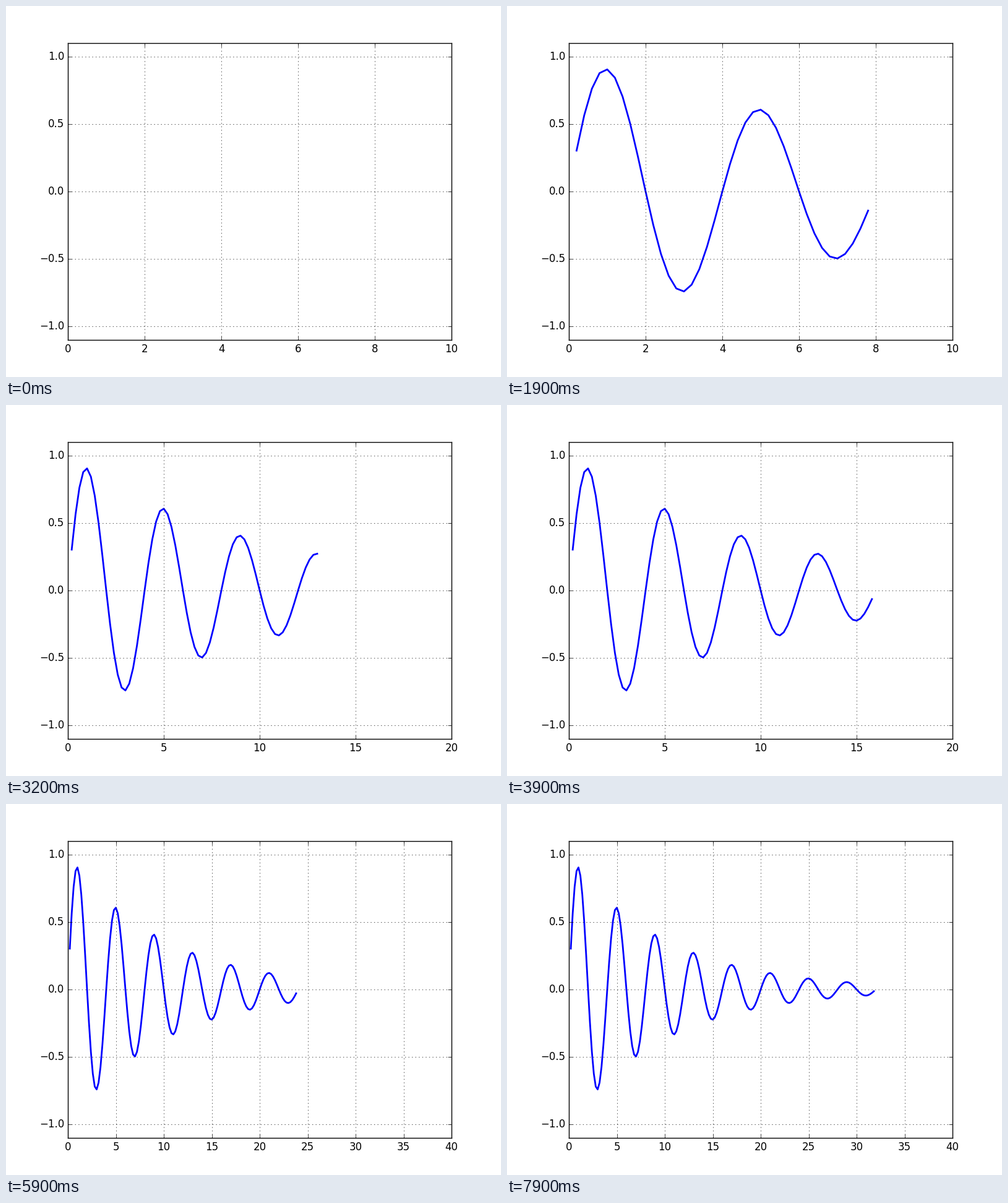
Recreate the animation shown at these times as a matplotlib script. Size 800 by 600 pixels, loop 8000 ms.

```python
import numpy as np
import matplotlib.pyplot as plt
from matplotlib.animation import FuncAnimation

FRAMES = 80
STEP = 0.2  # time between samples, two samples per frame

plt.style.use("classic")
plt.rcParams.update({
    "font.family": "DejaVu Sans",
    "figure.facecolor": "white",
    "savefig.facecolor": "white",
    "savefig.dpi": "figure",
})

fig, ax = plt.subplots(figsize=(8, 6), dpi=100)
line, = ax.plot([], [], color="blue", lw=2)
ax.set_ylim(-1.1, 1.1)
ax.set_xlim(0, 10)
ax.grid(True)


def damped_sine(t):
    return np.sin(0.5 * np.pi * t) * np.exp(-t / 10)


def axis_end(t):
    """Double the time axis whenever the curve reaches its end."""
    end = 10
    while t >= end:
        end *= 2
    return end


def update(frame):
    t = STEP * np.arange(1, 2 * frame + 2)
    line.set_data(t, damped_sine(t))
    ax.set_xlim(0, axis_end(t[-1]))
    return line,


def init():
    return update(0)


anim = FuncAnimation(fig, update, frames=FRAMES, init_func=init,
                     interval=100, repeat=True, repeat_delay=0, blit=False)
plt.show()
```
